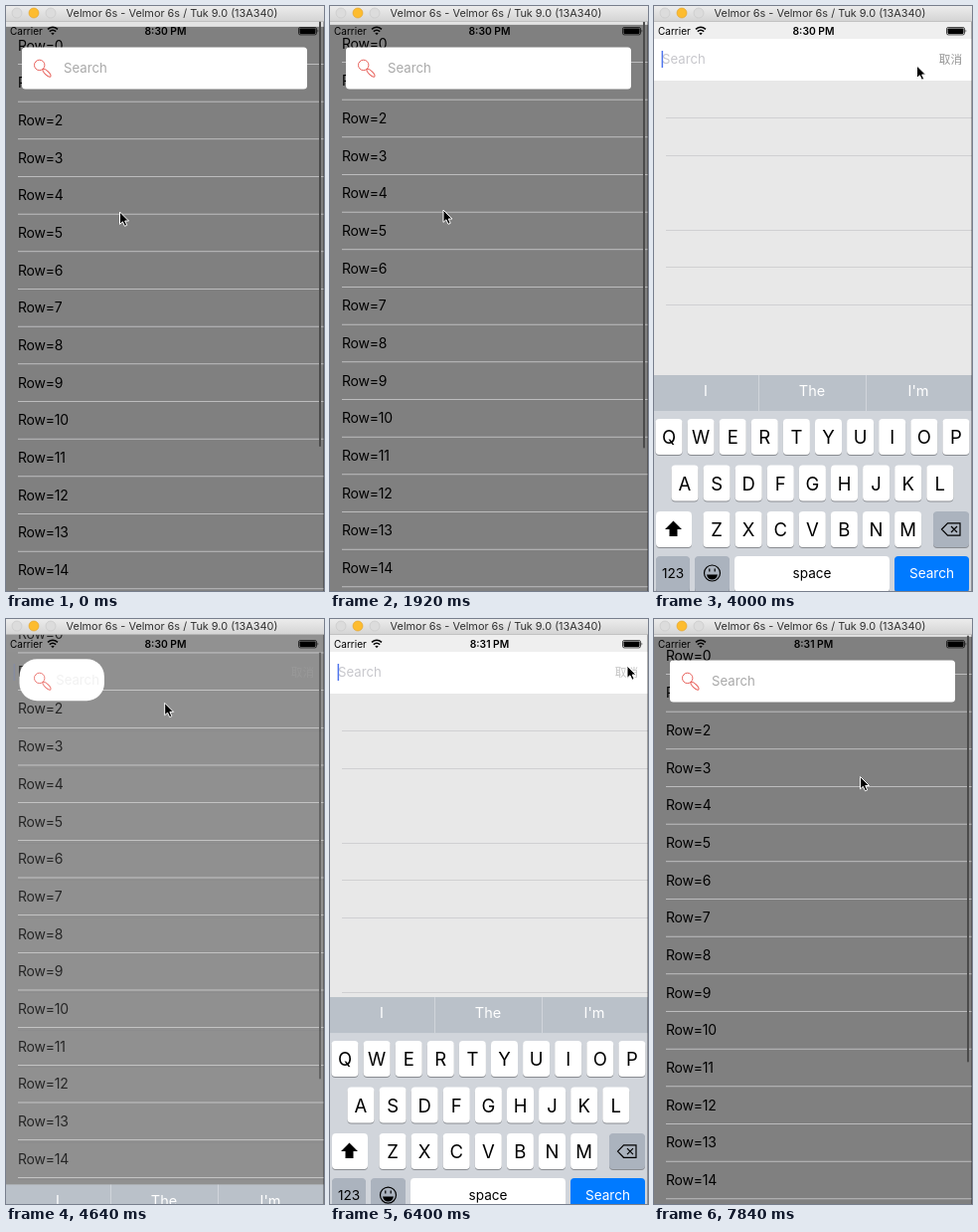
Recreate the animation shown at these times as an HTML page. Size 320 px wide and 588 px high, loop 8 s.

```html
<!DOCTYPE html>
<html lang="en">
<head>
<meta charset="utf-8">
<title>Collapsing search bar</title>
<style>
html, body { margin: 0; width: 100%; height: 100%; overflow: hidden; background: #808080; }
svg { display: block; width: 320px; height: 588px; font-family: Inter, Roboto, "Liberation Sans", sans-serif; }
.row { font-size: 14px; letter-spacing: -.2px; }
.hint { font-size: 13.2px; }
.cancel { font: 11.7px "Noto Sans CJK SC", "Noto Sans CJK", "Noto Sans CJK JP", sans-serif; }
.mid { text-anchor: middle; }
.key { font-size: 18.5px; }
.small { font-size: 13.6px; }
.word { font-size: 14.5px; fill: #fff; }
</style>
</head>
<body>
<svg viewBox="0 0 320 588">
  <defs>
    <linearGradient id="chrome" x2="0" y2="1">
      <stop offset="0" stop-color="#ececec"/><stop offset="1" stop-color="#d4d4d4"/>
    </linearGradient>
  </defs>
  <rect width="320" height="588" fill="#808080"/>
  <g id="list"></g>
  <rect id="thumb" x="315" width="2" height="429" rx="1" fill="#4b4b4b"/>
  <g id="sheet">
    <rect y="33" width="320" height="555" fill="#e8e8e8"/>
    <rect y="15" width="320" height="18" fill="#efefef"/>
  </g>
  <rect id="bar" fill="#fff"/>
  <g id="lens" fill="none" stroke="#e8605a" stroke-width="1">
    <circle cx="33.7" cy="59.4" r="5.2"/>
    <ellipse cx="41" cy="67.2" rx="5.2" ry="1.9" transform="rotate(44 41 67.2)"/>
  </g>
  <text id="hint" class="hint">Search</text>
  <g id="field">
    <rect x="7.6" y="45" width="1.5" height="17" fill="#5076ee"/>
    <text id="cancel" class="cancel" x="286.7" y="58">取消</text>
  </g>
  <g id="keys"></g>
  <text x="4" y="28.6" font-size="10">Carrier</text>
  <g fill="none" stroke="#000" stroke-width="1.5">
    <path d="M42 23.4q5-4.4 10 0M43.8 25.6q3.2-2.7 6.4 0"/>
    <path d="M47 29.2l-1.7-1.9q1.7-1.2 3.4 0z" fill="#000" stroke="none"/>
  </g>
  <text id="clock" class="mid" x="160.5" y="28.7" font-size="10.3" font-weight="600"></text>
  <rect x="294.5" y="21.5" width="18" height="7.4" rx="1.6" fill="none" stroke="#000" stroke-width=".7"/>
  <rect x="295.5" y="22.5" width="16" height="5.4" rx=".8"/>
  <path d="M313.6 23.6q1.4 1.6 0 3.2z"/>
  <rect x="319" y="15" width="1" height="573" fill="#000" opacity=".3"/>
  <rect width="320" height="15.5" fill="url(#chrome)"/>
  <rect y="15" width="320" height=".7" fill="#b5b5b5"/>
  <g stroke-width=".6">
    <circle cx="11" cy="7" r="5" fill="#dcdcdc" stroke="#c4c4c4"/>
    <circle cx="28" cy="7" r="5" fill="#fdbc2f" stroke="#e0a028"/>
    <circle cx="45" cy="7" r="5" fill="#dcdcdc" stroke="#c4c4c4"/>
  </g>
  <text class="mid" x="167" y="10.8" font-size="10.9" fill="#303030">Velmor 6s - Velmor 6s / Tuk 9.0 (13A340)</text>
  <path id="cursor" d="M0 0V12.4L2.9 9.8L5 14.3L7.2 13.3L5.2 9H9Z" stroke="#fff" stroke-width="1"/>
</svg>
<script>
const LOOP = 8000, STEP = 160, ROW = 37.67;
const $ = id => document.getElementById(id);

function add(parent, tag, attrs, text) {
  const el = document.createElementNS("http://www.w3.org/2000/svg", tag);
  set(el, attrs);
  if (text) el.textContent = text;
  parent.append(el);
  return el;
}
function set(el, attrs) {
  for (const name in attrs) el.setAttribute(name, attrs[name]);
}

// The list is laid out around the centre of its first row.
add($("list"), "rect", { y: -118.8, width: 320, height: 100, fill: "#e4e4e4" });
for (let i = 0; i < 17; i++) {
  const y = i * ROW;
  add($("list"), "text", { class: "row", x: 12, y: y + 5 }, "Row=" + i);
  add($("list"), "rect", { x: 12, y: y + 18.5, width: 308, height: .6, fill: "#e4e4e6" });
}
for (let i = 0; i < 13; i++) {
  if (i % 4 !== 2)
    add($("sheet"), "rect", { x: 12, y: Math.round(112 + i * 37.6), width: 308, height: 1, fill: "#d0d0d2" });
}

function key(x, y, w, label, fill = "#fff", kind = "key", ink = "#000") {
  const k = $("keys"), h = 36;
  add(k, "rect", { x, y: y + 1, width: w, height: h, rx: 4, fill: "#898c91" });
  add(k, "rect", { x, y, width: w, height: h, rx: 4, fill });
  if (label) add(k, "text", { class: kind + " mid", x: x + w / 2, y: y + (kind === "key" ? 25 : 22), fill: ink }, label);
}
function keyRow(letters, cx, y) {
  [...letters].forEach((c, i) => key(cx + i * 32.1 - 13.5, y, 27, c));
}

function buildKeyboard() {
  const k = $("keys"), grey = "#abb3be";
  add(k, "rect", { y: 371, width: 320, height: 217, fill: "#d1d5db" });
  add(k, "rect", { y: 371, width: 320, height: 36, fill: "#bac1c9" });
  for (const x of [105, 213]) add(k, "rect", { x, y: 371, width: 1, height: 36, fill: "#d1d5db" });
  ["I", "The", "I'm"].forEach((w, i) =>
    add(k, "text", { class: "word mid", x: 52 + i * 107, y: 392 }, w));
  keyRow("QWERTYUIOP", 15, 415);
  keyRow("ASDFGHJKL", 31, 461.5);
  keyRow("ZXCVBNM", 63, 508);
  key(2, 508, 36, "");
  key(281, 508, 36, "", grey);
  key(2, 553, 34, "123", grey, "small");
  key(41, 553, 35, "", grey);
  key(81, 553, 156, "space", "#fff", "small");
  key(242, 553, 75, "Search", "#007aff", "small", "#fff");
  add(k, "path", { d: "M19.5 517.5l8.5 8.5h-4.5v7h-8v-7H11z" });
  const line = { fill: "none", stroke: "#000", "stroke-width": 1.2 };
  add(k, "path", { ...line, d: "M289.5 526l6-6.2h12.5v12.4h-12.5zM299 523l6 6m0-6l-6 6" });
  add(k, "circle", { ...line, cx: 58.5, cy: 570, r: 8 });
  add(k, "path", { d: "M53 571.5h11q-1 5-5.5 5t-5.5-5z" });
  add(k, "path", { ...line, d: "M55.8 565.5v3m5.4-3v3" });
}
buildKeyboard();

const lerp = (a, b, u) => a + (b - a) * u;
const smooth = u => u * u * (3 - 2 * u);
const cubic = u => u < .5 ? 4 * u ** 3 : 1 - 4 * (1 - u) ** 3;

// Each track is a list of [time, value, ...]; col picks the value.
function at(track, t, ease = smooth, col = 1) {
  const i = track.findIndex(p => p[0] > t);
  if (i < 0) return track[track.length - 1][col];
  const a = track[i - 1], b = track[i];
  return lerp(a[col], b[col], ease((t - a[0]) / (b[0] - a[0])));
}

const scroll = [[0, 115], [240, 115], [1120, 91.5], [1280, 91.5], [1760, 113], [2080, 113],
  [2640, 90.5], [4800, 90.5], [5120, 111], [5200, 111], [5600, 88.5], [7040, 88.5], [7680, 112]];
const wide = [[0, 1], [560, 1], [960, 0], [1440, 0], [1760, 1], [2240, 1], [2560, 0],
  [4880, 0], [5120, 1], [5280, 1], [5520, 0], [7200, 0], [7600, 1]];
const open = [[0, 0], [3280, 0], [3680, 1], [4400, 1], [4720, 0], [5760, 0], [6080, 1], [6480, 1], [6800, 0]];
const keyboard = [[0, 0], [3360, 0], [3840, 1], [4295, 1], [4775, 0], [5800, 0], [6200, 1], [6295, 1], [6775, 0]];
const pointer = [[0, 114.5, 207], [240, 114.5, 207], [1120, 114, 181], [1280, 114, 181], [1760, 114, 205],
  [2080, 114, 205], [2640, 115.5, 181], [2720, 115.5, 181], [3200, 38, 60], [3440, 38, 60], [4000, 264.5, 60],
  [4160, 299, 50], [4400, 299, 50], [4800, 84, 103], [5120, 84, 125], [5200, 84, 125], [5600, 83, 99],
  [5760, 40, 62], [5840, 40, 62], [6240, 299, 47], [6480, 299, 47], [7040, 207, 135], [7680, 207.5, 158.5]];

function draw(t) {
  const y = at(scroll, t), e = at(wide, t), p = at(open, t), kb = at(keyboard, t, cubic);
  set($("list"), { transform: `translate(0 ${y - 2 * ROW})` });
  set($("thumb"), { y: 14 + .8 * (115 - y) });
  set($("sheet"), { opacity: p });
  set($("bar"), {
    x: lerp(16, 0, p), y: lerp(41.5, 33, p), height: 42,
    width: lerp(lerp(42, 287, e), 320, p), rx: lerp(lerp(21, 3.5, e), 0, p)
  });
  set($("lens"), { opacity: 1 - p });
  set($("hint"), {
    x: lerp(58, 8, p), y: lerp(67, 58, p), opacity: Math.max(e * e, p), fill: p > .5 ? "#c7c7cc" : "#a9a9a9"
  });
  set($("field"), { opacity: p });
  set($("cancel"), { fill: t >= 6320 || t >= 4240 && t < 4800 ? "#c4c4c4" : "#959595" });
  set($("keys"), { transform: `translate(0 ${217 * (1 - kb)})` });
  set($("cursor"), { transform: `translate(${at(pointer, t)} ${at(pointer, t, smooth, 2)})` });
  $("clock").textContent = t < 4800 ? "8:30 PM" : "8:31 PM";
}

const start = performance.now();
function tick() {
  const t = (performance.now() - start) % LOOP;
  draw(Math.floor(t / STEP) * STEP);
  requestAnimationFrame(tick);
}
tick();
</script>
</body>
</html>
```
